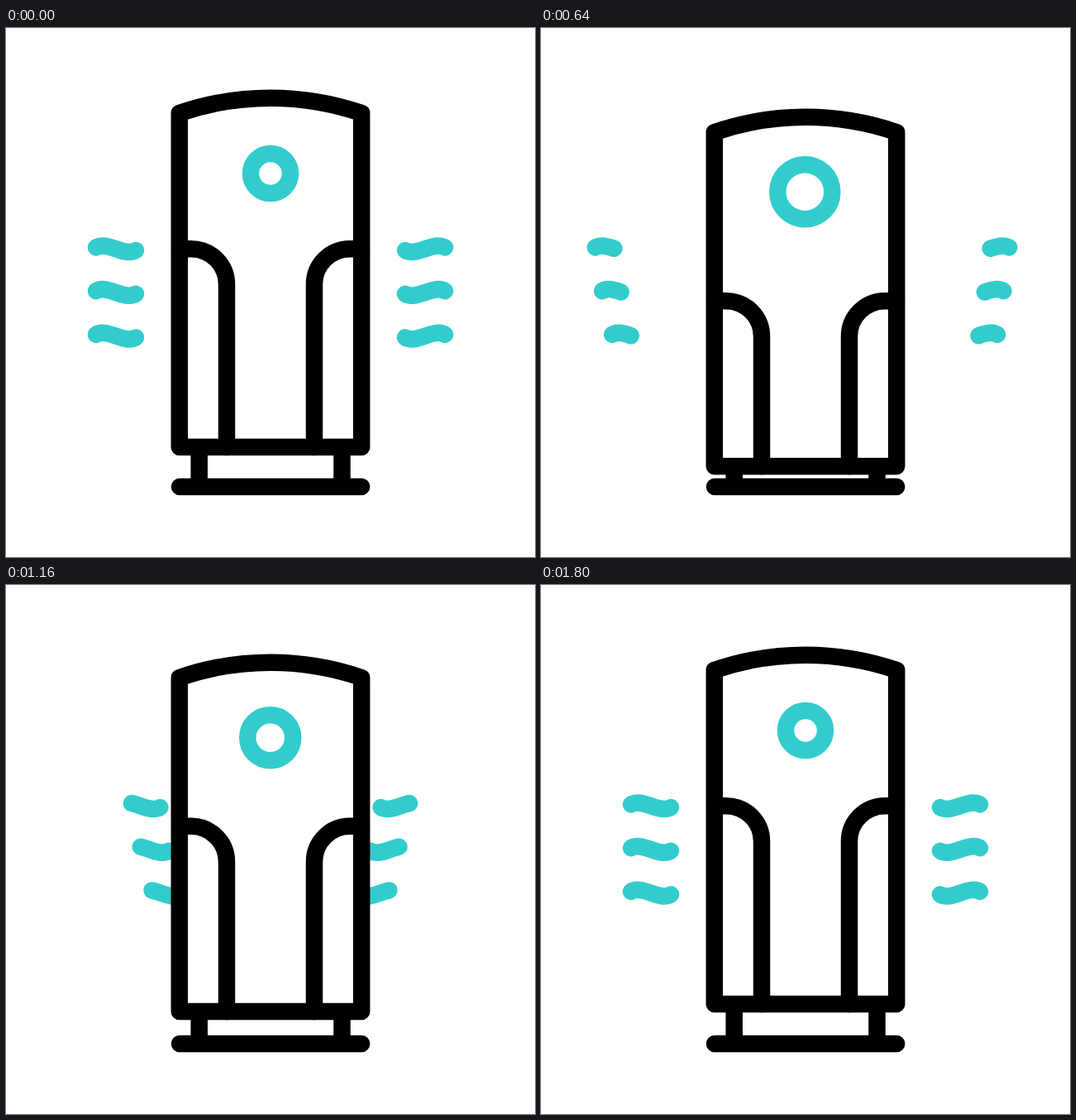
Animation, 640 px wide and 640 px high, one loop 2000 ms. Source, as an HTML page:

```html
<!DOCTYPE html>
<html lang="en">
<head>
<meta charset="utf-8">
<title>Air purifier</title>
<style>
  html, body { margin: 0; width: 100%; height: 100%; overflow: hidden; background: #fff; }
  svg { display: block; width: 100%; height: 100%; }
  path, circle { fill: none; stroke-width: 20.5; stroke-linecap: round; stroke-linejoin: round; }
  .ink { stroke: #000; }
  .teal { stroke: #3cc; }
  #shell { fill: #fff; }
</style>
</head>
<body>
<svg viewBox="0 0 640 640">
  <g id="waves"></g>
  <path class="ink" d="M233.7 507V555M406.5 507V555M210 555H430.2"/>
  <g id="body">
    <path id="shell" class="ink" d="M209.8 103A340 340 0 0 1 430.2 103V507H209.8Z"/>
    <path id="panels" class="ink"/>
    <circle id="ring" class="teal"/>
  </g>
</svg>
<script>
const LOOP = 2000, STEP = 40;
const WAVE = "M109 265.5C122 257 144 277.5 157 269";
const ROW_GAP = 52.7;

// Per row: outward drift of the leaving wave [left, right],
// inward start of the arriving wave [left, right], arrival time.
const ROWS = [
  { out: [82, 67],   from: [142, 142], end: 1520 },
  { out: [66.3, 54], from: [160, 167], end: 1600 },
  { out: [43.3, 40], from: [185, 185], end: 1680 }
];

const $ = id => document.getElementById(id);

// Ease with flat ends: cubic-bezier(grip, 0, 1 - grip, 1) between two times.
function ease(t, start, end, grip) {
  const x = Math.min(1, Math.max(0, (t - start) / (end - start)));
  let lo = 0, hi = 1;
  for (let i = 0; i < 30; i++) {
    const s = (lo + hi) / 2, r = 1 - s;
    if (3 * r * r * s * grip + 3 * r * s * s * (1 - grip) + s ** 3 < x) lo = s; else hi = s;
  }
  const s = x === 0 || x === 1 ? x : lo;
  return s * s * (3 - 2 * s);
}
const firm = (t, start, end) => ease(t, start, end, 1 / 6);
const soft = (t, start, end) => ease(t, start, end, 1 / 3);

function makeWave() {
  const path = document.createElementNS("http://www.w3.org/2000/svg", "path");
  path.setAttribute("class", "teal");
  path.setAttribute("d", WAVE);
  path.setAttribute("pathLength", 1);
  return $("waves").appendChild(path);
}

const waves = ROWS.flatMap((row, index) => [0, 1].map(side =>
  ({ row, index, side, leaving: makeWave(), arriving: makeWave() })));

function placeWave(path, { index, side }, shift, from, to) {
  path.style.display = to - from > 0.0005 ? "" : "none";
  const mirror = side ? "translate(640 0) scale(-1 1) " : "";
  path.setAttribute("transform", `${mirror}translate(${shift} ${index * ROW_GAP})`);
  const whole = from === 0 && to === 1;
  path.setAttribute("stroke-dasharray", whole ? "none" : `${to - from} 3`);
  path.setAttribute("stroke-dashoffset", -from);
}

function draw(t) {
  const press = firm(t, 80, 640) - firm(t, 640, 1520);
  const top = 267.2 + 39.8 * press;
  $("body").setAttribute("transform", `translate(0 ${23.2 * press})`);
  $("panels").setAttribute("d",
    `M210 ${top}H224a43 43 0 0 1 43 43V507M430 ${top}H416a43 43 0 0 0 -43 43V507`);
  $("ring").setAttribute("cx", 320 - 0.7 * press);
  $("ring").setAttribute("cy", 176 - press);
  $("ring").setAttribute("r", 24 + 9 * press);

  const leave = soft(t, 80, 1160);
  const grow = firm(t, 200, 1600);
  for (const wave of waves) {
    const { row, side, leaving, arriving } = wave;
    placeWave(leaving, wave, -row.out[side] * leave, 0, 1 - leave);
    placeWave(arriving, wave, row.from[side] * (1 - firm(t, 80, row.end)), 1 - grow, 1);
  }
}

function tick() {
  draw(Math.floor(performance.now() % LOOP / STEP) * STEP);
  requestAnimationFrame(tick);
}
tick();
</script>
</body>
</html>
```
